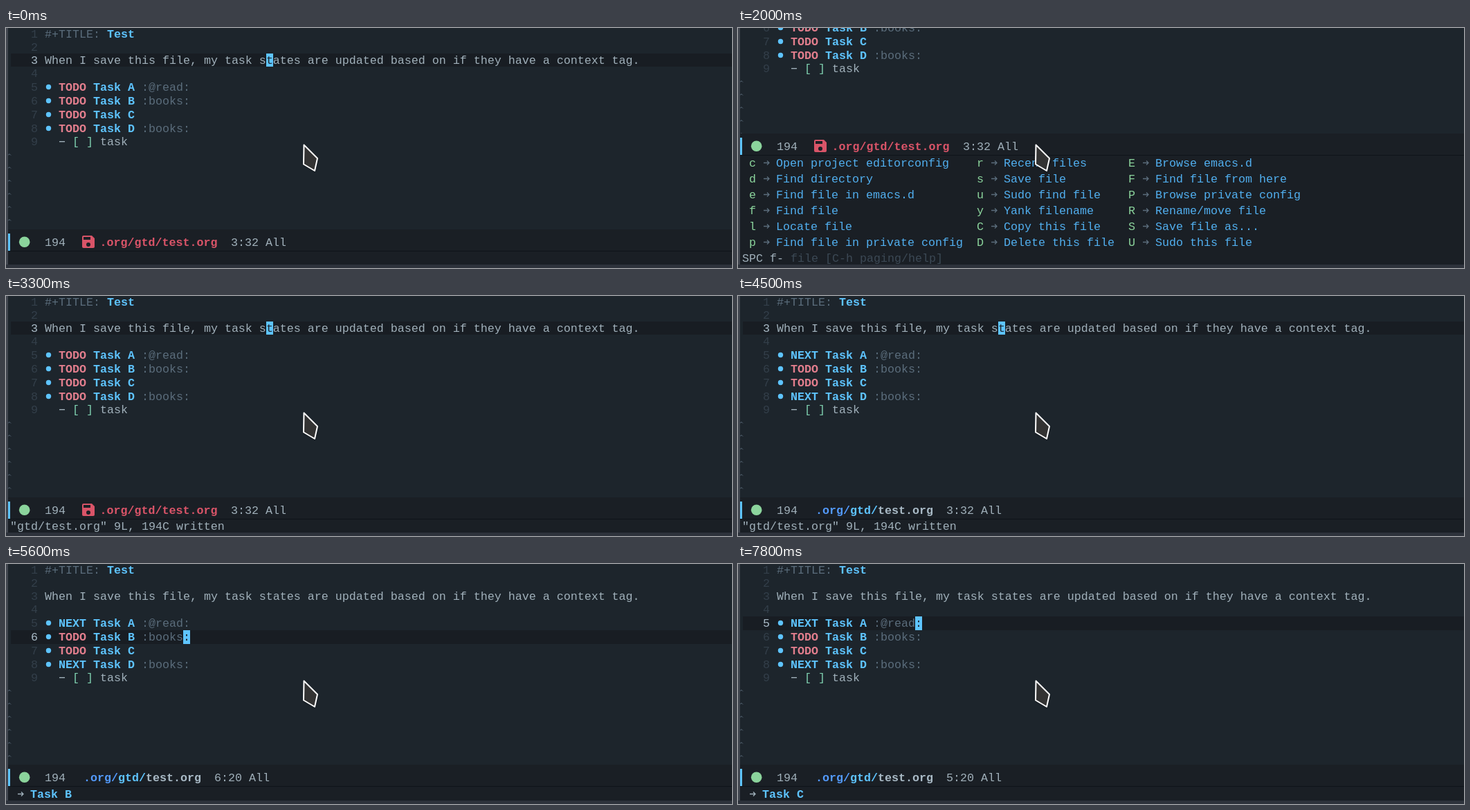
An HTML page with a canvas that plays this animation: 1049 by 348 pixels, repeating every 8000 ms.

```html
<!DOCTYPE html>
<html lang="en">
<head>
<meta charset="utf-8">
<title>Task states</title>
<style>
html, body { margin: 0; width: 100%; height: 100%; overflow: hidden; background: #1d252c; }
canvas { display: block; }
</style>
</head>
<body>
<canvas id="stage" width="1049" height="348"></canvas>
<script>
const ctx = document.getElementById('stage').getContext('2d');
const W = 1049, H = 348, CW = 10, LEFT = 56, LOOP = 8000;
const C = {
  bg: '#1d252c', alt: '#1a1f25', hl: '#181d23', rule: '#0f1419',
  fg: '#a0b0ba', dim: '#5b6d7c', faint: '#3c4955', num: '#333f4a', bright: '#a9bac6',
  blue: '#5ec4ff', label: '#51afef', deep: '#539afc', red: '#d95468', pink: '#e27e8d',
  green: '#8bd49c', teal: '#7fd0b0', edge: '#41464f', foot: '#2d323b'
};

// Tops of the nine text lines
const TOPS = [-1, 18, 37, 56, 76, 96, 116, 136, 155];
const SENTENCE = 'When I save this file, my task states are updated based on if they have a context tag.';
const TASKS = [['A', ':@read:'], ['B', ':books:'], ['C', ''], ['D', ':books:']];
const CURSOR_COL = { 3: 32, 4: 0, 5: 20, 6: 20, 7: 12 };

// Popup columns: key x, then "key label" rows
const MENU = [
  [16, ['c Open project editorconfig', 'd Find directory', 'e Find file in emacs.d',
        'f Find file', 'l Locate file', 'p Find file in private config']],
  [345, ['r Recent files', 's Save file', 'u Sudo find file',
         'y Yank filename', 'C Copy this file', 'D Delete this file']],
  [564, ['E Browse emacs.d', 'F Find file from here', 'P Browse private config',
         'R Rename/move file', 'S Save file as...', 'U Sudo this file']]
];

const WRITTEN = '"gtd/test.org" 9L, 194C written';
const LINE_STEPS = [[0, 3], [4600, 4], [4800, 5], [5000, 6], [6200, 5], [6800, 6],
                    [7000, 7], [7600, 6], [7800, 5]];
const ECHO_STEPS = [[0, ''], [500, 'SPC-'], [900, 'SPC f-'], [1900, 'SPC f- |file [C-h paging/help]'],
                    [3200, WRITTEN], [4600, ''], [5600, '>Task B'], [6700, '>Task A'], [7500, '>Task C']];

function at(steps, t) {
  let value = steps[0][1];
  for (const [start, v] of steps) if (t >= start) value = v;
  return value;
}

function rect(x, y, w, h, color) {
  ctx.fillStyle = color;
  ctx.fillRect(x, y, w, h);
}

function dot(x, y, r, color) {
  ctx.fillStyle = color;
  ctx.beginPath();
  ctx.arc(x, y, r, 0, Math.PI * 2);
  ctx.fill();
}

function text(str, x, y, color, bold) {
  ctx.font = (bold ? 'bold ' : '') + '16.667px "Liberation Mono", monospace';
  ctx.fillStyle = color;
  ctx.fillText(str, x, y);
}

function arrow(x, base, color) {
  const y = base - 5.5;
  ctx.strokeStyle = color;
  ctx.lineWidth = 1.3;
  ctx.beginPath();
  ctx.moveTo(x + 1, y);
  ctx.lineTo(x + 9, y);
  ctx.moveTo(x + 6, y - 3);
  ctx.lineTo(x + 9, y);
  ctx.lineTo(x + 6, y + 3);
  ctx.stroke();
}

function drawLine(n, base, saved) {
  const put = (str, col, color, bold) => text(str, LEFT + col * CW, base, color, bold);
  if (n === 1) {
    put('#+TITLE:', 0, C.dim);
    put('Test', 9, C.blue, true);
  } else if (n === 3) {
    put(SENTENCE, 0, C.fg);
  } else if (n >= 5 && n <= 8) {
    const [name, tag] = TASKS[n - 5];
    const next = saved && (name === 'A' || name === 'D');
    dot(LEFT + 5.5, base - 5.5, 3.7, C.blue);
    put(next ? 'NEXT' : 'TODO', 2, next ? C.blue : C.pink, true);
    put('Task ' + name, 7, C.blue, true);
    put(tag, 14, C.dim);
  } else if (n === 9) {
    rect(LEFT + 21, base - 6, 8, 1.4, C.fg);
    put('[ ]', 4, C.teal);
    put('task', 8, C.fg);
  }
}

function drawBuffer(line, saved, scroll) {
  ctx.save();
  ctx.translate(0, -scroll);
  const top = TOPS[line - 1], height = TOPS[line] - top;
  rect(7, top, W - 7, height, C.hl);
  TOPS.forEach((y, i) => {
    const n = i + 1;
    text(String(n), 36, y + 15, n === line ? C.bright : C.num);
    drawLine(n, y + 15, saved);
  });

  // Block cursor redraws the glyph beneath it in the background colour
  const col = CURSOR_COL[line], x = LEFT + col * CW;
  rect(x, top, CW, height, C.blue);
  const glyph = line === 3 ? SENTENCE[col] : line === 7 ? 'C' : line === 4 ? '' : ':';
  text(glyph, x, top + 15, C.bg, line === 7);

  // Empty-line marks in the fringe
  ctx.strokeStyle = C.dim;
  ctx.lineWidth = 1;
  for (let i = 0; i < 6; i++) {
    const y = 183.5 + i * 19;
    ctx.beginPath();
    ctx.moveTo(3, y + 1);
    ctx.quadraticCurveTo(4.5, y - 2, 6, y);
    ctx.lineTo(7, y + 1);
    ctx.stroke();
  }
  ctx.restore();
}

function diskIcon(x, y) {
  ctx.fillStyle = C.red;
  ctx.beginPath();
  ctx.moveTo(x + 2, y);
  ctx.lineTo(x + 14, y);
  ctx.lineTo(x + 18, y + 4);
  ctx.lineTo(x + 18, y + 16);
  ctx.quadraticCurveTo(x + 18, y + 18, x + 16, y + 18);
  ctx.lineTo(x + 2, y + 18);
  ctx.quadraticCurveTo(x, y + 18, x, y + 16);
  ctx.lineTo(x, y + 2);
  ctx.quadraticCurveTo(x, y, x + 2, y);
  ctx.fill();
  rect(x + 2, y + 2, 10, 4, C.alt);
  dot(x + 9, y + 13, 3, C.alt);
}

function drawModeline(base, line, saved) {
  rect(3, base - 24, W, 31, C.alt);
  rect(3, base - 18, 3, 25, C.blue);
  rect(3, base + 7, W, 1, C.rule);
  dot(26.7, base - 5.7, 7.8, C.green);
  text('194', 56, base, C.fg);
  const place = line + ':' + CURSOR_COL[line] + ' All';
  if (saved) {
    text('.org/', 112, base, C.deep, true);
    text('gtd/', 162, base, C.blue, true);
    text('test.org', 202, base, C.bright, true);
    text(place, 301, base, C.fg);
  } else {
    diskIcon(110, base - 15);
    text('.org/gtd/test.org', 135.5, base, C.red, true);
    text(place, 325, base, C.fg);
  }
}

function drawMenu() {
  rect(3, 185, W, 140, C.alt);
  for (const [x, rows] of MENU) {
    rows.forEach((row, i) => {
      const base = 201 + i * 23;
      text(row[0], x, base, C.green);
      arrow(x + 20, base, C.dim);
      text(row.slice(2), x + 39, base, C.label);
    });
  }
}

function drawEcho(str) {
  if (str[0] === '>') {
    arrow(16, 339, C.fg);
    text(str.slice(1), 35, 339, C.blue, true);
    return;
  }
  const [main, hint = ''] = str.split('|');
  text(main, 6, 339, C.fg);
  text(hint, 6 + main.length * CW, 339, C.faint);
}

function drawPointer() {
  ctx.save();
  ctx.beginPath();
  ctx.moveTo(430.5, 169.5);
  ctx.lineTo(450, 189);
  ctx.lineTo(446, 207);
  ctx.lineTo(430, 197.5);
  ctx.closePath();
  ctx.shadowColor = 'rgba(0,0,0,.4)';
  ctx.shadowBlur = 3;
  ctx.shadowOffsetY = 1;
  ctx.fillStyle = '#333';
  ctx.fill();
  ctx.shadowColor = 'transparent';
  ctx.strokeStyle = '#fff';
  ctx.lineWidth = 2;
  ctx.lineJoin = 'round';
  ctx.stroke();
  ctx.restore();
}

function draw(t) {
  const line = at(LINE_STEPS, t);
  const saved = t >= 3400;
  const menu = t >= 2000 && t < 3300;
  const base = menu ? 177 : t < 5600 ? 316 : 315;

  rect(0, 0, W, H, C.bg);
  drawBuffer(line, saved, menu ? 106 : 0);
  rect(3, base + 8, W, H, C.alt);
  drawModeline(base, line, saved);
  if (menu) drawMenu();
  drawEcho(at(ECHO_STEPS, t));
  rect(0, 0, 3, H, C.edge);
  rect(0, 343, W, 5, C.foot);
  drawPointer();
}

const start = performance.now();
function tick() {
  draw((performance.now() - start) % LOOP);
  requestAnimationFrame(tick);
}
tick();
</script>
</body>
</html>
```
